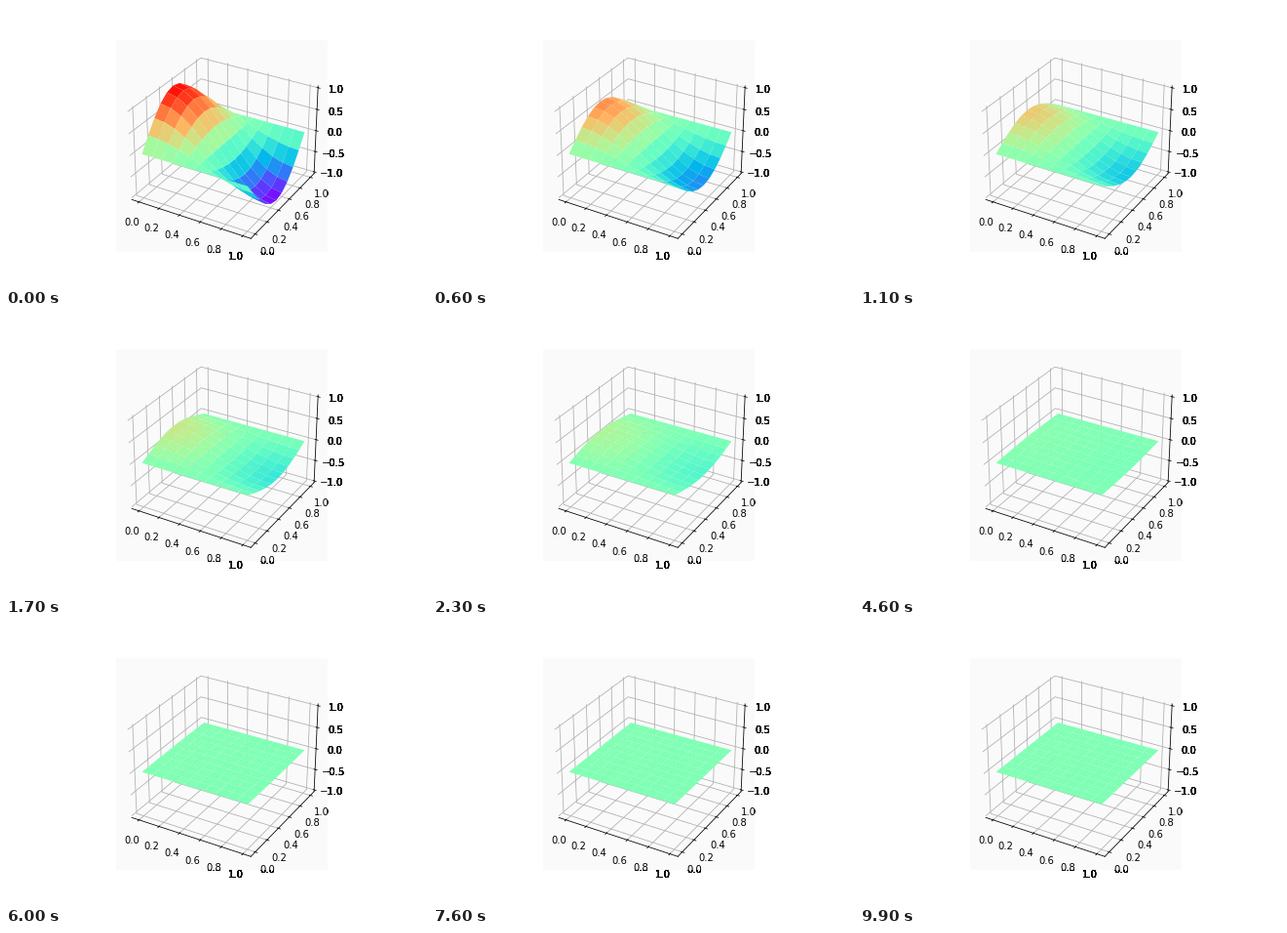
Recreate the animation shown at these times as a matplotlib script. Size 432x288 px, loop 10000 ms.

```python
import numpy as np
import matplotlib.pyplot as plt
from matplotlib.animation import FuncAnimation

FRAMES = 100
DECAY = 0.0745
PANEL = "#fafafa"

fig = plt.figure(figsize=(6, 4), dpi=72, facecolor="white")
fig.subplots_adjust(left=0.125, right=0.9, bottom=0.125, top=0.88)
ax = fig.add_subplot(projection="3d", facecolor=PANEL)
ax.set_xlim(-0.05, 1.05, view_margin=1 / 48)
ax.set_ylim(-0.05, 1.05, view_margin=1 / 48)
ax.set_zlim(-1, 1, view_margin=1 / 48)
ax.set_xticks(np.linspace(0, 1, 6))
ax.set_yticks(np.linspace(0, 1, 6))
ax.set_zticks(np.linspace(-1, 1, 5))
axes3 = (ax.xaxis, ax.yaxis, ax.zaxis)
for axis in axes3:
    axis.set_pane_color((1, 1, 1, 0))

grid = np.linspace(0, 1, 11)
X, Y = np.meshgrid(grid, grid)
MODE = np.cos(np.pi * X) * np.sin(np.pi * Y)


def harden_labels(copies=8):
    """Stack label copies behind the panel so only their outer parts look heavy."""
    fig.canvas.draw()
    for axis in axes3:
        for tick in axis.get_major_ticks():
            label = tick.label1
            for _ in range(copies):
                fig.text(*label.get_position(), label.get_text(),
                         transform=ax.transData, ha=label.get_ha(),
                         va=label.get_va(), zorder=-1)


def draw(i):
    for surface in list(ax.collections):
        surface.remove()
    ax.plot_surface(X, Y, MODE * np.exp(-DECAY * i), cmap="rainbow",
                    vmin=-1, vmax=1, rstride=1, cstride=1, linewidth=0)
    ax.set_xlim(-0.05, 1.05, view_margin=1 / 48)
    ax.set_ylim(-0.05, 1.05, view_margin=1 / 48)
    ax.set_zlim(-1, 1, view_margin=1 / 48)
    return ax.collections


harden_labels()
anim = FuncAnimation(fig, draw, frames=FRAMES, init_func=lambda: draw(0),
                     interval=100, repeat=True, repeat_delay=0, blit=False)
plt.show()
```
